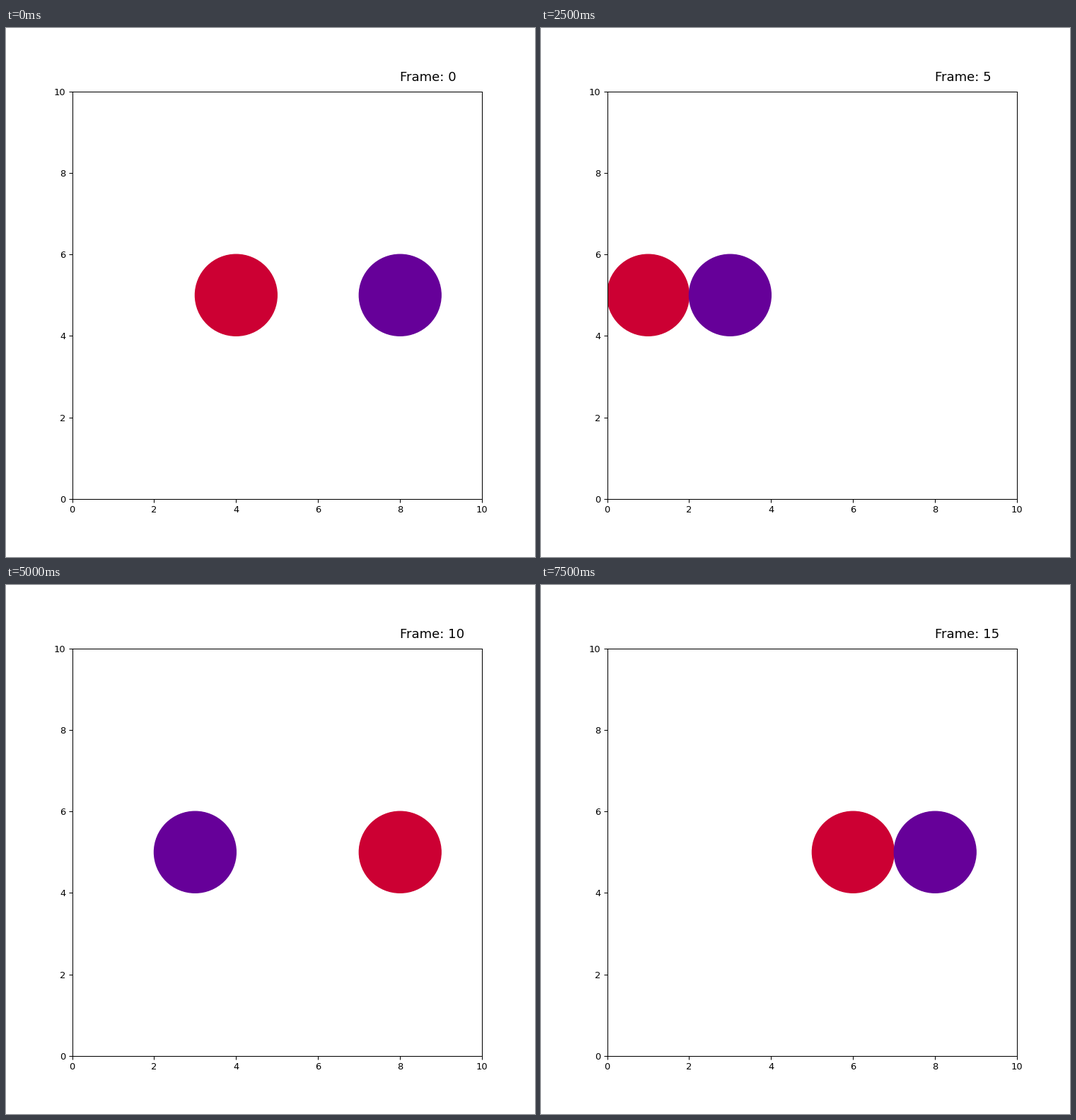
A matplotlib script for the animation above (8000 ms loop, 748 px wide and 748 px high).

```python
import matplotlib.pyplot as plt
from matplotlib.animation import FuncAnimation
from matplotlib.patches import Circle

STEP_MS = 500
ROW = 5
RED, PURPLE = "#cc0033", "#660099"

# Both discs jump to a new whole-number x at every step.
RED_X = [4, 6, 4, 6, 2, 1, 3, 5, 6, 5, 8, 5, 2, 2, 4, 6]
PURPLE_X = [8, 5, 7, 3, 5, 3, 2, 2, 1, 2, 3, 6, 7, 8, 9, 8]

plt.rcParams["font.family"] = "DejaVu Sans"
fig, ax = plt.subplots(figsize=(8, 8), dpi=93.5)
ax.set_xlim(0, 10)
ax.set_ylim(0, 10)


def add_disc(x, color):
    return ax.add_patch(Circle((x, ROW), 1, color=color))


red = add_disc(RED_X[0], RED)
purple = add_disc(PURPLE_X[0], PURPLE)
label = ax.text(8, 10.25, "Frame: 0", fontsize=14)


def update(i):
    red.center = RED_X[i], ROW
    purple.center = PURPLE_X[i], ROW
    label.set_text(f"Frame: {i}")
    return red, purple, label


anim = FuncAnimation(fig, update, frames=len(RED_X), interval=STEP_MS,
                     repeat=True, repeat_delay=0, blit=False)
plt.show()
```
